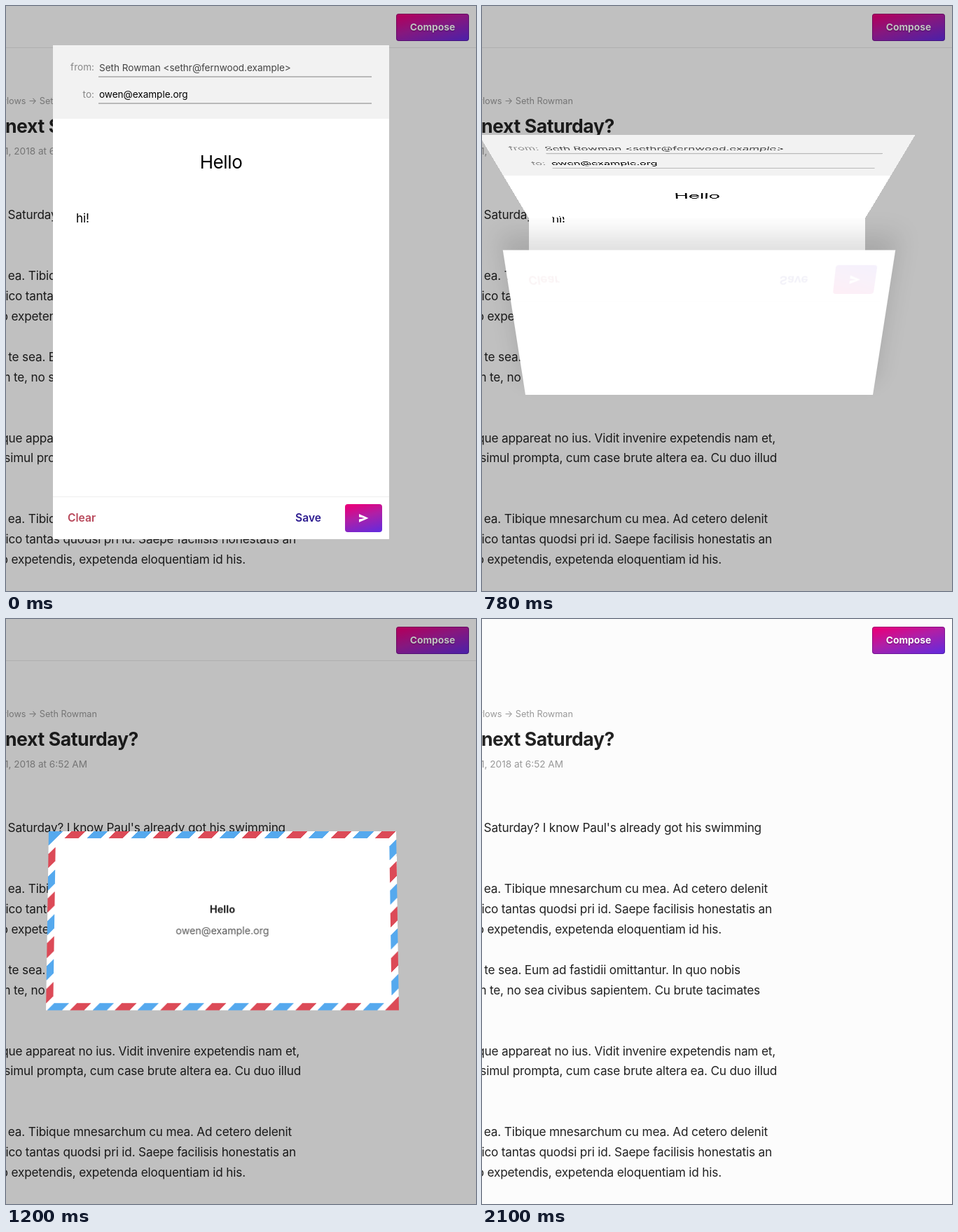
An HTML page that plays this animation: 671x835 px, repeating every 2130 ms.

```html
<!DOCTYPE html>
<html lang="en">
<head>
<meta charset="utf-8">
<title>Folding letter</title>
<style>
html, body { margin: 0; width: 100%; height: 100%; overflow: hidden; }
body { background: #fcfcfc; font-family: Inter, Roboto, "Liberation Sans", sans-serif; }
#stage { position: absolute; left: 0; top: 0; width: 671px; height: 835px; overflow: hidden; background: #fcfcfc; }
#stage div { position: absolute; box-sizing: border-box; }
.t { white-space: pre; height: 30px; line-height: 30px; }
.body { font-size: 17.2px; letter-spacing: -.17px; color: #222; }
.title { font-size: 26.6px; letter-spacing: -.4px; font-weight: 700; color: #222; }
.meta { font-size: 13.6px; color: #999; }
.rule { left: 0; top: 59px; width: 671px; height: 1px; background: #e6e6e6; }
.btn { border-radius: 4px; background: linear-gradient(165deg, #e6007c 8%, #b01fa6 45%, #5f2be0 100%); }
.compose { left: 557px; top: 11px; width: 104px; height: 39px; box-shadow: inset 0 0 0 1px rgba(60,0,90,.4);
  color: #fff; font-weight: 700; font-size: 13.8px; line-height: 39px; text-align: center; text-shadow: 0 1px 2px rgba(0,0,0,.35); }
#shade { left: 0; top: 0; width: 671px; height: 835px; background: #000; }
#mail { left: 0; top: 0; width: 671px; height: 835px; transform-origin: 309.25px 429px; }
.part { left: 67px; width: 480px; overflow: hidden; }
.paper { left: 0; width: 480px; height: 705px; background: #fff; }
.head { left: 0; top: 0; width: 480px; height: 105px; background: #f2f2f2; }
.field { left: 65px; width: 390px; height: 2px; background: #b9b9b9; }
.label { right: 421px; font-size: 13.6px; color: #888; }
.value { left: 66px; font-size: 13.6px; letter-spacing: -.04px; }
.foot { left: 0; top: 644px; width: 480px; height: 1px; background: #eee; }
.act { font-size: 15.6px; font-weight: 600; }
.send { left: 417px; top: 655px; width: 53px; height: 40px; }
.send svg { position: absolute; left: 20px; top: 14px; }
#back { left: 61.5px; top: 339px; width: 496px; height: 216px; background: #fff; transform-origin: 50% 100%; }
#back .part { left: 5.5px; bottom: 0; transform: scaleY(-1); opacity: .06; }
#cover { left: 61.25px; top: 303px; width: 496px; height: 252px; transform-origin: 50% 0;
  background: repeating-linear-gradient(135deg, #fff 0 .5px, #55a9ee .5px 14.8px, #fff 14.8px 22.9px,
    #dc4a57 22.9px 37.2px, #fff 37.2px 44.76px); }
#cover .inner { left: 10px; top: 10px; right: 10px; bottom: 10px; background: #fff; text-align: center; }
#cover .t { left: 0; width: 100%; }
</style>
</head>
<body>
<div id="stage">
  <div class="rule" id="rule"></div>
  <div class="btn compose">Compose</div>
  <div id="page"></div>
  <div id="shade"></div>
  <div id="mail"></div>
</div>

<template id="letter">
  <div class="paper">
    <div class="head"></div>
    <div class="t label" style="top:16px">from:</div>
    <div class="t value" style="top:17px;color:#444">Seth Rowman &lt;sethr@fernwood.example&gt;</div>
    <div class="field" style="top:44px"></div>
    <div class="t label" style="top:55px">to:</div>
    <div class="t value" style="top:55px;color:#000">owen@example.org</div>
    <div class="field" style="top:82px"></div>
    <div class="t" style="left:0;width:480px;top:152px;text-align:center;font-size:26px;letter-spacing:-.4px">Hello</div>
    <div class="t body" style="left:33px;top:232px;color:#000">hi!</div>
    <div class="foot"></div>
    <div class="t act" style="left:21px;top:660px;color:#b8475a">Clear</div>
    <div class="t act" style="right:97px;top:660px;color:#2d1c90">Save</div>
    <div class="btn send"><svg width="14" height="12"><path d="M0 0L13.5 6L0 12V7.6L8 6L0 4.4Z" fill="#fff"/></svg></div>
  </div>
</template>

<script>
const LOOP = 2130, TOP = 56, UP = 303, LOW = 555, END = 761;
const $ = id => document.getElementById(id);

function add(parent, cls, id) {
  const el = document.createElement('div');
  el.className = cls;
  if (id) el.id = id;
  return parent.appendChild(el);
}

// Page lines end at a known right edge and run off the left side.
function line(text, right, mid, cls) {
  const el = add($('page'), 't ' + cls);
  el.textContent = text;
  el.style.right = -right + 'px';
  el.style.top = mid - 15 + 'px';
  return el;
}

$('page').style.cssText = 'left:0;top:0;width:0;height:835px';
const meta = [
  line('Dana Barlows → Seth Rowman', 130, 136, 'meta'),
  line('Apr 1, 2018 at 6:52 AM', 116, 207, 'meta')
];
meta[0].style.fontSize = '12.7px';
line('Swimming next Saturday?', 189, 171, 'title');
const again = [
  ['brute altera ea. Tibique mnesarchum cu mea. Ad cetero delenit', 408],
  ['amico tantas quodsi pri id. Saepe facilisis honestatis an', 414],
  ['duo expetendis, expetenda eloquentiam id his.', 342]
];
line("Saturday? I know Paul's already got his swimming", 399, 298, 'body');
again.forEach(([s, r], i) => {
  line(s, r, 384.5 + 29 * i, 'body');
  line(s, r, 732 + 28.8 * i, 'body');
});
line('te sea. Eum ad fastidii omittantur. In quo nobis', 369, 500.5, 'body');
line('illum te, no sea civibus sapientem. Cu brute tacimates', 397, 529.5, 'body');
line('Tibique appareat no ius. Vidit invenire expetendis nam et,', 419, 616.5, 'body');
line('simul prompta, cum case brute altera ea. Cu duo illud', 421, 645, 'body');

// A horizontal strip of the letter.
function strip(parent, from, to) {
  const el = add(parent, 'part');
  el.style.height = to - from + 'px';
  el.append($('letter').content.cloneNode(true));
  el.firstElementChild.style.top = TOP - from + 'px';
  return el;
}
function place(from, to, origin) {
  const el = strip($('mail'), from, to);
  el.style.top = from + 'px';
  el.style.transformOrigin = origin;
  return el;
}

place(UP, LOW, '50% 50%');
const lowFront = place(LOW, END, '50% 0');
const lowBack = add($('mail'), '', 'back');
strip(lowBack, LOW, END);
const topFront = place(TOP, UP, '50% 100%');
const cover = add($('mail'), '', 'cover');
const inner = add(cover, 'inner');
[['Hello', 86, '700 14.4px', '#222'], ['owen@example.org', 116, '400 14.1px', '#555']].forEach(([s, y, font, color]) => {
  const el = add(inner, 't');
  el.textContent = s;
  el.style.cssText = `top:${y}px;font:${font}/30px Inter,Roboto,sans-serif;color:${color}`;
});

const clamp = x => Math.min(1, Math.max(0, x));

// cubic-bezier(.25, .1, .25, 1)
function ease(x) {
  if (x <= 0 || x >= 1) return clamp(x);
  let a = 0, b = 1, u = .5;
  for (let i = 0; i < 30; i++) {
    u = (a + b) / 2;
    if (.75 * u * (1 - u) + u ** 3 < x) a = u; else b = u;
  }
  return .3 * u * (1 - u) ** 2 + 3 * u * u * (1 - u) + u ** 3;
}

function tilt(el, deg, shown) {
  el.style.visibility = shown ? 'visible' : 'hidden';
  el.style.transform = Math.abs(deg) < .01 ? 'none' : `perspective(1000px) rotateX(${deg}deg)`;
}

function draw(t) {
  const low = 180 * ease((t - 318) / 891);
  const top = 180 * ease((t - 610) / 722);
  tilt(lowFront, low, low < 90);
  tilt(lowBack, low - 180, low >= 90);
  tilt(topFront, -top, top < 90);
  tilt(cover, 180 - top, top >= 90);

  // The flap's shadow fades as it comes to rest.
  const lift = Math.sin(low * Math.PI / 180);
  lowBack.style.boxShadow = `0 -20px 30px rgba(0,0,0,${(.24 * lift).toFixed(3)})`;

  // The closed envelope shrinks away to the left.
  const fly = clamp((t - 1585) / 170), k = fly * fly * (3 - 2 * fly);
  const mail = $('mail');
  mail.style.display = fly < 1 ? 'block' : 'none';
  mail.style.transform = fly ? `translate(${-480 * k}px, ${-190 * k}px) scale(${1 - .8 * k})` : 'none';

  const fade = clamp((t - 1625) / 360);
  $('shade').style.opacity = .24 * (1 - fade);
  $('rule').style.opacity = fade > 0 ? 0 : 1;
  meta.forEach(el => el.style.opacity = fade > 0 && fade < .8 ? 0 : 1);
}

const start = performance.now();
function tick() {
  draw((performance.now() - start) % LOOP);
  requestAnimationFrame(tick);
}
tick();
</script>
</body>
</html>
```
